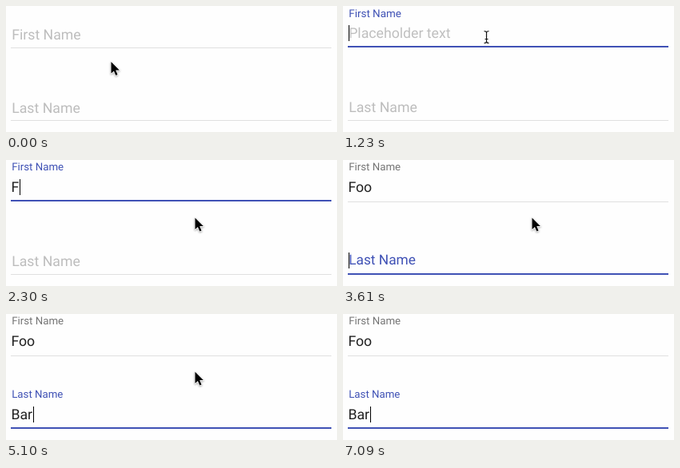
Recreate the animation shown at these times as an HTML page. Size 414 by 158 pixels, loop 9.8 s.

```html
<!DOCTYPE html>
<html lang="en">
<head>
<meta charset="utf-8">
<title>Floating label inputs</title>
<style>
  html, body { margin: 0; width: 100%; height: 100%; overflow: hidden; background: #fefefe; }
  svg { display: block; width: 414px; height: 158px; }
  text { font: 17.7px Roboto, sans-serif; text-rendering: geometricPrecision; white-space: pre; }
  .arrow { filter: drop-shadow(0 1px 0.8px rgba(0, 0, 0, .35)); }
</style>
</head>
<body>
<svg id="stage" viewBox="0 0 414 158">
  <g id="fields"></g>
  <g id="pointer">
    <path id="arrow" class="arrow" d="M0 0V14.6L3.4 11.5L5.8 17L8.1 16L5.7 10.6H10.4Z"
      stroke="#fff" stroke-width="1.6" paint-order="stroke" stroke-linejoin="round"/>
    <g id="beam" fill="none">
      <path d="M-3 -7.5Q0 -7.5 0 -5.5Q0 -7.5 3 -7.5M0 -6V6M-3 7.5Q0 7.5 0 5.5Q0 7.5 3 7.5M-2 2.5H2"
        stroke="#111" stroke-width="1.2"/>
    </g>
  </g>
</svg>
<script>
const LOOP = 9800;
const BLUE = '#3f51b5', HINT = '#bdbdbd', GREY = '#757575', LINE = '#e0e0e0', INK = '#212121';
const $ = id => document.getElementById(id);

function add(parent, tag, attrs) {
  const el = document.createElementNS('http://www.w3.org/2000/svg', tag);
  set(el, attrs);
  return parent.appendChild(el);
}
function set(el, attrs) {
  for (const name in attrs) el.setAttribute(name, attrs[name]);
}

const clamp = x => Math.min(1, Math.max(0, x));
const mix = (a, b, k) => a + (b - a) * k;
const progress = (t, from, to) => clamp((t - from) / (to - from));
const smooth = k => k * k * (3 - 2 * k);

// cubic-bezier(.25, .8, .25, 1)
function swift(x) {
  let lo = 0, hi = 1;
  const curve = (s, a, b) => 3 * (1 - s) ** 2 * s * a + 3 * (1 - s) * s * s * b + s ** 3;
  for (let i = 0; i < 20; i++) {
    const mid = (lo + hi) / 2;
    if (curve(mid, .25, .25) < x) lo = mid; else hi = mid;
  }
  return curve(lo, .8, 1);
}

const fields = [
  { name: 'First Name', hint: 'Placeholder text', y: 0, line: 52, focusLine: 50,
    focus: 1000, blur: 3600, typed: 'Foo', keys: [2300, 2600, 2710],
    caretOff: [[1590, 2060], [3190, 3600]] },
  { name: 'Last Name', hint: '', y: 92, line: 143, focusLine: 142,
    focus: 3600, blur: LOOP, typed: 'Bar', keys: [4450, 4750, 5100],
    caretOff: [[4150, 4450], [5640, 6140], [6550, 7090]] },
];

for (const f of fields) {
  f.underline = add($('fields'), 'rect', { x: 6, width: 401 });
  f.hintText = add($('fields'), 'text', { x: 7.2, y: f.y + 39.9, fill: HINT });
  f.hintText.textContent = f.hint;
  f.label = add($('fields'), 'text', {});
  f.label.textContent = f.name;
  f.value = add($('fields'), 'text', { x: 6.4, y: f.y + 40.3, fill: INK });
  f.caret = add($('fields'), 'rect', { y: f.y + 24, width: 1, height: 20, fill: '#000' });
}

function drawField(f, t) {
  const focused = t >= f.focus && t < f.blur;
  const float = swift(progress(t, f.focus, f.focus + 400));
  const typed = f.typed.slice(0, f.keys.filter(k => t >= k).length);
  // A resting label sits a pixel higher while the first field has focus
  const nudge = f.y && t >= 1000 && t < f.focus ? 1 : 0;

  set(f.underline, {
    y: focused ? f.focusLine : f.line,
    height: focused ? 2 : 1,
    fill: focused ? BLUE : LINE,
  });
  set(f.label, {
    transform: `translate(7.2 ${f.y + mix(42, 13.2, float) - nudge}) scale(${mix(1, .75, float)})`,
    fill: focused ? BLUE : t < f.focus ? HINT : GREY,
  });
  set(f.hintText, { opacity: typed ? 0 : float });
  f.value.textContent = typed;

  const width = typed ? f.value.getComputedTextLength() : 0;
  const lit = focused && !f.caretOff.some(([from, to]) => t >= from && t < to);
  set(f.caret, { x: Math.round(7 + width), opacity: lit ? 1 : 0 });
}

function pointerAt(t) {
  if (t < 1260) {
    const k = smooth(progress(t, 260, 580));
    return [mix(131.5, 179.5, k), mix(70, 39, k)];
  }
  if (t < 5750) {
    const k = smooth(progress(t, 1260, 1700));
    return [mix(179.5, 236.5, k), mix(39, 72.5, k)];
  }
  const k = progress(t, 5750, 6140) ** 1.3;
  const bend = (a, b, c) => mix(mix(a, b, k), mix(b, c, k), k);
  return [bend(236.5, 350, 367), bend(72.5, 90, 162)];
}

function drawPointer(t) {
  const [x, y] = pointerAt(t);
  const overInput = y < 52;
  set($('pointer'), { transform: `translate(${x} ${y})` });
  set($('arrow'), { visibility: overInput ? 'hidden' : 'visible' });
  set($('beam'), { visibility: overInput ? 'visible' : 'hidden' });
}

function frame() {
  const t = performance.now() % LOOP;
  for (const f of fields) drawField(f, t);
  drawPointer(t);
  requestAnimationFrame(frame);
}
frame();
</script>
</body>
</html>
```
